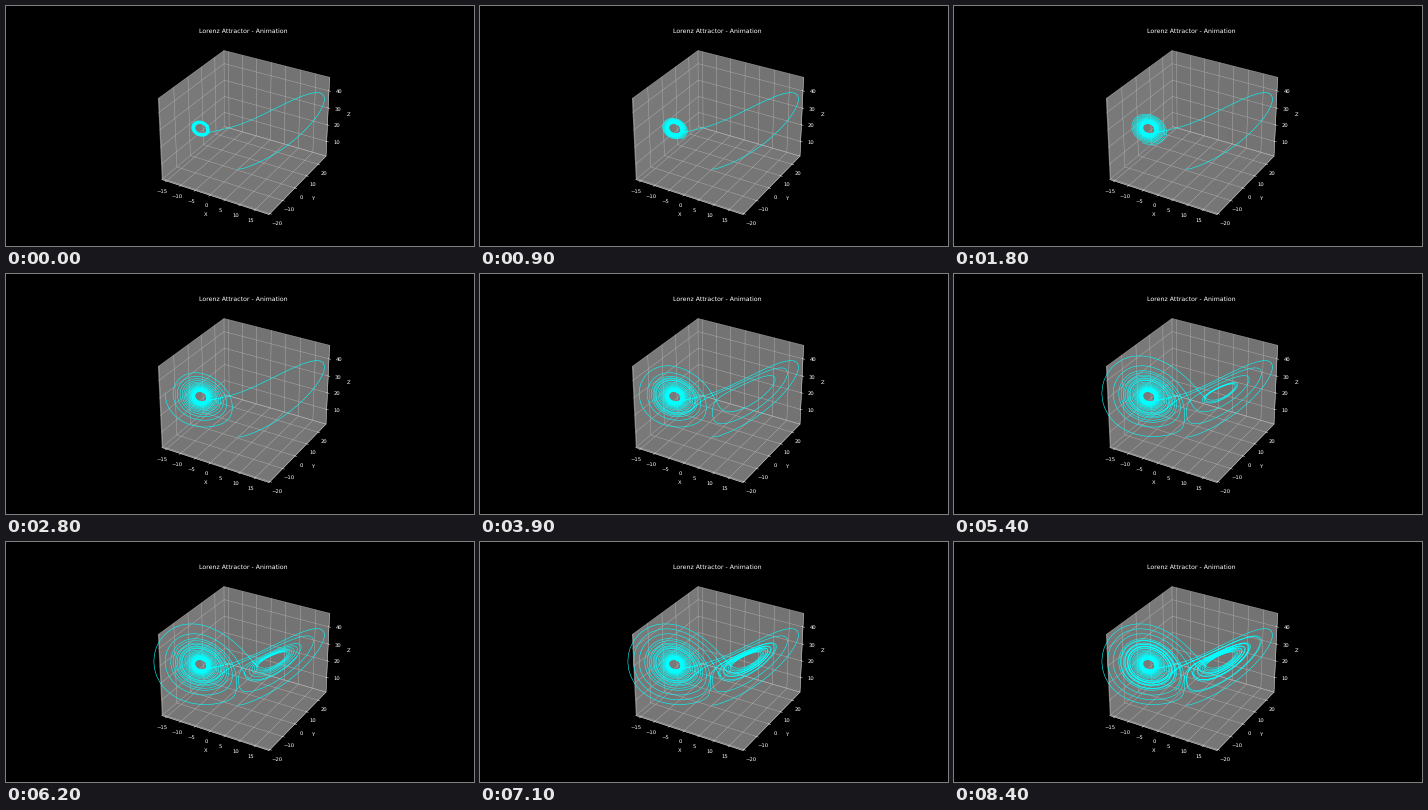
A matplotlib script that plays this animation: 468 px wide and 240 px high, repeating every 8500 ms.

```python
import numpy as np
import matplotlib.pyplot as plt
from matplotlib.animation import FuncAnimation

plt.style.use("dark_background")
plt.rcParams.update({"text.hinting": "none", "grid.color": "#b4b4b4",
                     "axes.edgecolor": "#d0d0d0"})

W, H, DPI = 468, 240, 37.5
FRAMES, INTERVAL = 85, 100
SIGMA, RHO, BETA = 10.0, 28.0, 8.0 / 3.0
DT, KEEP, T_END = 0.002, 5, 40.0   # integration step, kept every KEEP steps
RATE = 0.30                        # model time per frame
TURN_FRAME = 28                    # last swing on the left before crossing over


def flow(p):
    x, y, z = p
    return np.array([SIGMA * (y - x), x * (RHO - z) - y, x * y - BETA * z])


def rk4(p, h):
    a = flow(p)
    b = flow(p + h / 2 * a)
    c = flow(p + h / 2 * b)
    d = flow(p + h * c)
    return p + h / 6 * (a + 2 * b + 2 * c + d)


def trajectory():
    p = np.array([0.0, 1.0, 1.05])
    points = [p]
    for n in range(1, int(round(T_END / DT)) + 1):
        p = rk4(p, DT)
        if n % KEEP == 0:
            points.append(p)
    return np.array(points).T


xyz = trajectory()
step = DT * KEEP

# Time of the widest left swing before the first crossing to the right lobe
early = int(5 / step)
cross = early + int(np.argmax(xyz[0, early:] > 0))
leftness = 0.866 * xyz[0] / np.ptp(xyz[0]) + 0.5 * xyz[1] / np.ptp(xyz[1])
turn = (early + int(np.argmin(leftness[early:cross]))) * step
start = turn - TURN_FRAME * RATE

fig = plt.figure(figsize=(W / DPI, H / DPI), dpi=DPI)
side, left, bottom = 190.9, 141.4, 19.4
ax = fig.add_axes([left / W, bottom / H, side / W, side / H], projection="3d")
ax.set(xlim=(-16.6, 19.5), ylim=(-20.7, 27.2), zlim=(0.95, 47.8),
       xlabel="X", ylabel="Y", zlabel="Z", zticks=range(10, 50, 10))
ax.set_title("Lorenz Attractor - Animation")
trail, = ax.plot([], [], [], color="cyan", lw=1.1,
                 scalex=False, scaley=False)


def update(i):
    n = int(round((start + i * RATE) / step)) + 1
    trail.set_data_3d(*xyz[:, :n])
    return trail,


anim = FuncAnimation(fig, update, frames=FRAMES, interval=INTERVAL,
                     init_func=lambda: update(0), repeat=True, blit=False)
plt.show()
```
